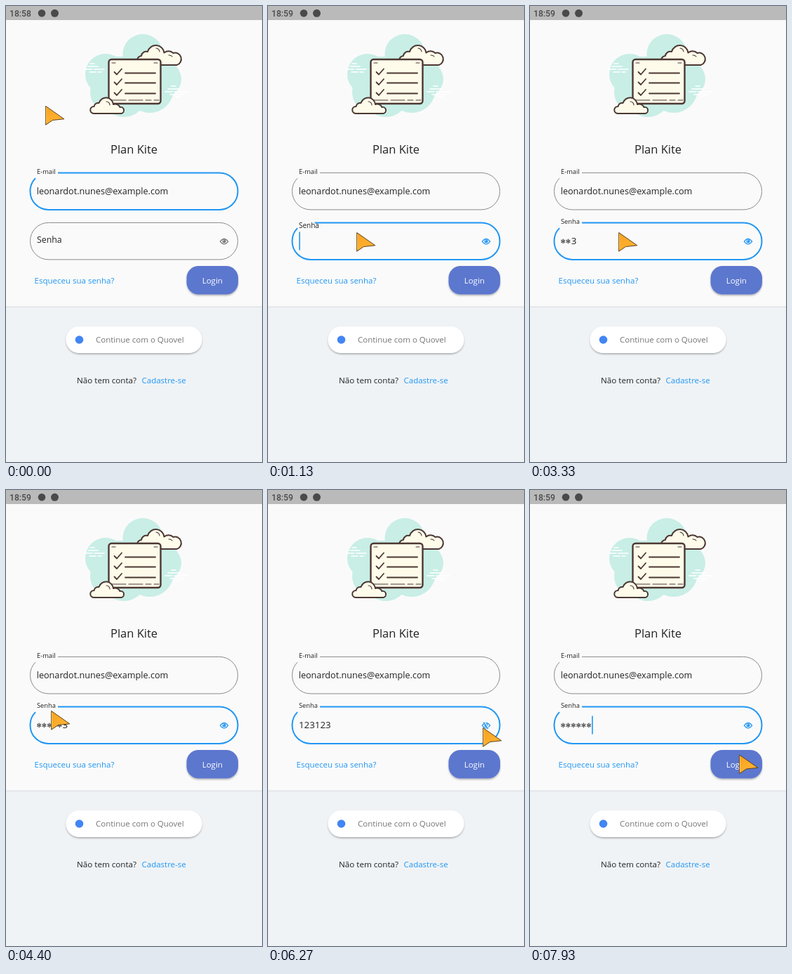
An HTML page for the animation above (8000 ms loop, 365 by 649 pixels).

```html
<!DOCTYPE html>
<html lang="pt-BR">
<head>
<meta charset="utf-8">
<title>Login</title>
<style>
  html, body { margin: 0; width: 100%; height: 100%; overflow: hidden; background: #fafafa; }
  svg { display: block; width: 100%; height: 100%; }
  text { font-family: "Open Sans", "Noto Sans", sans-serif; font-size: 11.5px; fill: #222; }
  .clock { font: 500 12.2px Roboto, sans-serif; fill: #4a4a4a; }
  .title { font-size: 16.5px; }
  .label { font-size: 9.3px; }
  .value { font-size: 12.65px; }
  .secret { font-size: 13.3px; }
  .stars { font: 8.75px "DejaVu Sans", sans-serif; }
  .link { fill: #2196f3; }
  .mid { text-anchor: middle; }
  .field { fill: none; stroke: #8a8a8a; stroke-width: 1; }
  .field.on { stroke: #2196f3; stroke-width: 2; }
  .caret { fill: #2196f3; }
  .eye { color: #757575; }
  .eye.on { color: #2196f3; }
  .ink { fill: #fefbea; stroke: #4c3833; stroke-width: 2; stroke-linejoin: round; stroke-linecap: round; }
  .thin { fill: none; stroke-width: 1.8; }
  .fine { fill: none; stroke-width: 1.1; }
  .streak { fill: none; stroke: #fff; stroke-width: 1.6; stroke-linecap: round; }
</style>
</head>
<body>
<svg viewBox="0 0 365 649" preserveAspectRatio="none">
  <defs>
    <filter id="soft" x="-20%" y="-30%" width="140%" height="180%">
      <feDropShadow dx="0" dy="1.6" stdDeviation="1.3" flood-opacity=".3"/>
    </filter>
    <linearGradient id="amber" x1="0" y1="0" x2=".7" y2="1">
      <stop offset="0" stop-color="#f9a01f"/>
      <stop offset="1" stop-color="#ffb534"/>
    </linearGradient>
  </defs>

  <!-- backdrop -->
  <rect width="365" height="649" fill="#fafafa"/>
  <rect y="428" width="365" height="221" fill="#eff3f6"/>
  <rect y="427.5" width="365" height="1.6" fill="#dfe3e6"/>
  <rect width="365" height="20" fill="#bababa"/>
  <text class="clock" id="clock" x="5" y="14.6">18:58</text>
  <circle cx="51" cy="10.3" r="5.3" fill="#4a4a4a"/>
  <circle cx="69.5" cy="10.3" r="5.5" fill="#4a4a4a"/>

  <!-- illustration -->
  <g fill="#c8eee6">
    <circle cx="195" cy="68.500" r="28.500"/>
    <circle cx="142" cy="97" r="29"/>
    <circle cx="148" cy="123" r="28"/>
    <circle cx="168" cy="125" r="33"/>
    <circle cx="205" cy="118" r="34"/>
    <circle cx="225" cy="104" r="25"/>
    <rect x="150" y="72" width="68" height="70"/>
  </g>
  <path class="streak" d="M120 82h6M117 86h14M113 90h10M126 90h14M119 94h9M131 94h5M236 114h6M231 118h17M227 122h10M240 122h20M234 126h9M246 126h7M243 129h5"/>
  <path class="ink" d="M194 84a6.5 6.5 0 0 1-1-13a7 7 0 0 1 9-6a12 12 0 0 1 23.500 1.500a10 10 0 0 1 13 .5a8.500 8.500 0 0 1 5 17Z"/>
  <path class="ink fine" d="M214 60a6 6 0 0 1 5 5M232 70a6 6 0 0 1 5 2"/>
  <rect class="ink" x="146.500" y="76" width="74" height="63" rx="4" style="stroke-width:2.400"/>
  <path class="ink fine" d="M149 134h22M175 134h20M199 134h8M211 134h7M151 81h5M211 81h5"/>
  <path class="ink thin" d="M154.500 94l3.500 3.500l7-8M154.500 108.500l3.500 3.500l7-8M154.500 123.500l3.500 3.500l7-8M170 95.500h43M170 109.500h43M170 124.500h43"/>
  <path class="ink" d="M125 153a5 5 0 0 1 .500-10a6 6 0 0 1 7-5a10.500 10.500 0 0 1 20.500 2a7.500 7.500 0 0 1 9.500 4a4.600 4.600 0 0 1 2 9Z"/>
  <path class="ink fine" d="M143 136a5 5 0 0 1 5 5"/>

  <!-- form -->
  <text class="title mid" x="182.500" y="209.700">Plan Kite</text>
  <path class="field on" id="mailBox"/>
  <text class="label" x="44" y="239">E-mail</text>
  <text class="value" x="43.700" y="268.300">leonardot.nunes@example.com</text>
  <rect class="caret" id="mailCaret" x="232.300" y="250" width="1.600" height="26.500"/>

  <path class="field" id="passBox" transform="translate(0 71)"/>
  <text id="passLabel" x="44">Senha</text>
  <text class="stars" id="stars" x="43.500" y="338.200"></text>
  <text class="secret" id="digits" y="339.300"></text>
  <rect class="caret" id="passCaret" y="321.500" width="1.600" height="26"/>
  <g class="eye" id="eye" transform="translate(311 335.200)">
    <path d="M-5.700 0Q0-7.600 5.700 0Q0 7.600-5.700 0Z" fill="none" stroke="currentColor" stroke-width="1.100"/>
    <circle r="2.500" cy="-.4" fill="currentColor"/>
    <circle r=".8" cx="-.7" cy="-1.200" fill="#fafafa"/>
    <g id="slash">
      <path d="M-2.600-5.200L3.900 4.600" stroke="#fafafa" stroke-width="1.400"/>
      <path d="M-3.600-4.800L2.800 5" stroke="currentColor" stroke-width="1.200"/>
    </g>
  </g>

  <text class="link" x="40.600" y="395">Esqueceu sua senha?</text>
  <rect x="257.500" y="370" width="73.500" height="40.500" rx="17" fill="#5c77ce" filter="url(#soft)"/>
  <text class="mid" x="294.300" y="395" style="fill:#fff">Login</text>
  <rect x="85.500" y="456" width="194" height="38" rx="19" fill="#fff" filter="url(#soft)"/>
  <circle cx="104.500" cy="475" r="5.800" fill="#4285f4"/>
  <text x="128" y="479.400" style="fill:#757575">Continue com o Quovel</text>
  <text x="101" y="537" style="font-size:11.650px">Não tem conta?</text>
  <text class="link" x="193.500" y="537">Cadastre-se</text>

  <!-- pointer -->
  <g id="pointer">
    <path d="M.7.500L26.800 18.800L10.500 20.500L.7 27.200Z" fill="url(#amber)" stroke="#5f421c" stroke-linejoin="round"/>
    <path d="M1.600 2.500V24.500" stroke="#ffc95a"/>
  </g>
</svg>
<script>
const LOOP = 8000, STAR = 7.32, DIGIT = 7.6, LEFT = 44;
const $ = id => document.getElementById(id);
const ui = Object.fromEntries(['clock', 'mailBox', 'mailCaret', 'passBox', 'passLabel', 'stars',
  'digits', 'passCaret', 'eye', 'slash', 'pointer'].map(id => [id, $(id)]));

// [time, x, y] of the pointer
const moves = [
  [0, 56, 142], [470, 60, 153], [530, 76, 196], [600, 102, 258], [670, 120, 306], [730, 126, 322],
  [4270, 110, 321], [4330, 80, 318], [4400, 64, 314], [4470, 68, 307], [4530, 98, 301],
  [4600, 152, 302], [4670, 216, 312], [4730, 268, 324], [4800, 291, 331], [4870, 302, 336],
  [4930, 305, 337], [5070, 306, 338], [7730, 305, 345], [7800, 302, 359], [7870, 299, 371], [7930, 298, 376.500]
];
const floats = [[0, 0], [1070, .33], [1130, .77], [1200, 1]];
const typed = [[0, ''], [2470, '1'], [2670, '✻2'], [2870, '✻✻3'], [3400, '✻✻✻1'], [3600, '✻✻✻✻2'],
  [3800, '✻✻✻✻✻3'], [5330, '123123'], [6670, '✻✻✻✻✻✻']];
// spans in which the password caret is lit
const lit = [[1070, 1530], [2070, 3330], [3400, 4270], [4800, 5270], [5730, 6270], [6800, 7270], [7800, LOOP]];

const at = (list, t) => list.findLast(k => k[0] <= t);
const show = (el, on) => el.setAttribute('visibility', on ? 'visible' : 'hidden');
const mix = (a, b, p) => a + (b - a) * p;

// Rounded outline; the gap for a floating label ends at x = gap
function outline(gap) {
  const rest = 'H304.5a26 26 0 0 1 26 26v.5a26 26 0 0 1-26 26H60.5a26 26 0 0 1-26-26v-.5';
  return gap ? `M${gap} 237.4${rest}A26 26 0 0 1 42 245.1` : `M60.5 237.4${rest}a26 26 0 0 1 26-26Z`;
}

function draw(t) {
  const [, x, y] = at(moves, t);
  const p = at(floats, t)[1];
  const text = at(typed, t)[1];
  const stars = text.replace(/\d/g, ''), digits = text.slice(stars.length);
  const split = LEFT + stars.length * STAR;

  ui.pointer.setAttribute('transform', `translate(${x} ${y})`);
  ui.clock.textContent = t < 530 ? '18:58' : '18:59';
  ui.mailBox.classList.toggle('on', !p);
  show(ui.mailCaret, t >= 470 && t < 930);

  ui.passBox.classList.toggle('on', p > 0);
  ui.passBox.setAttribute('d', outline(p && mix(42, 74, p)));
  ui.passLabel.setAttribute('y', mix(337, 310, p));
  ui.passLabel.style.fontSize = mix(12.3, 9.3, p) + 'px';

  ui.stars.textContent = stars;
  ui.digits.textContent = digits;
  ui.digits.setAttribute('x', split);
  ui.passCaret.setAttribute('x', split + digits.length * DIGIT + .2);
  show(ui.passCaret, lit.some(([a, b]) => t >= a && t < b));
  ui.eye.classList.toggle('on', p > 0);
  show(ui.slash, t >= 5330 && t < 6670);
}

ui.mailBox.setAttribute('d', outline(74));
const start = performance.now();
function tick() {
  draw((performance.now() - start) % LOOP);
  requestAnimationFrame(tick);
}
tick();
</script>
</body>
</html>
```
